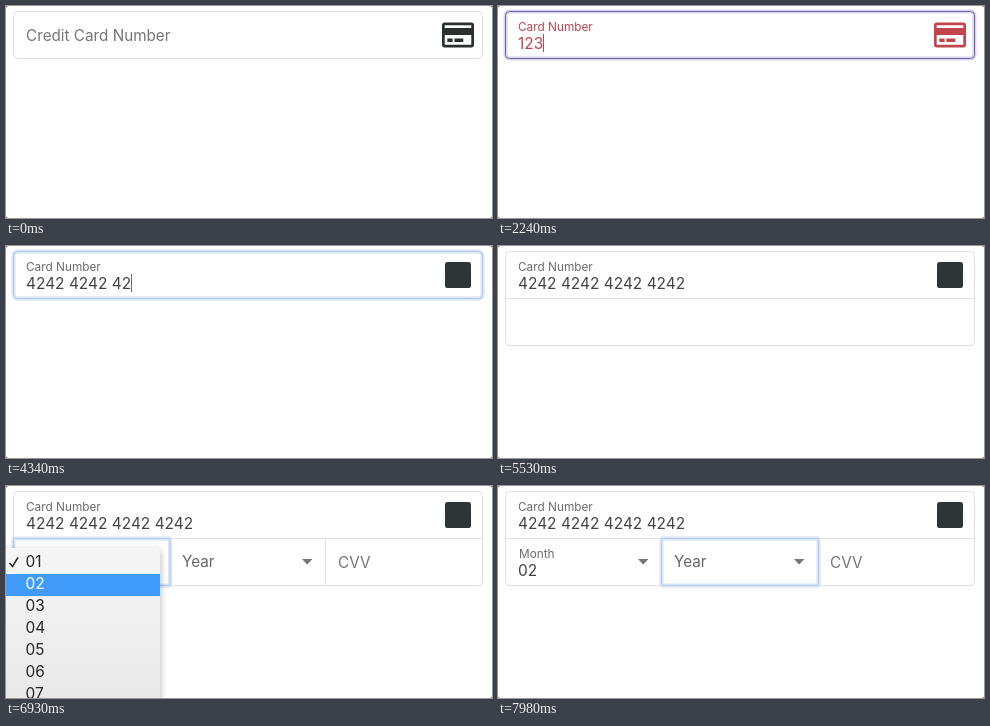
Write an HTML page that moves like this. It is 486 px wide and 212 px high and loops after 8 s.

```html
<!DOCTYPE html>
<html lang="en">
<head>
<meta charset="utf-8">
<title>Credit card form</title>
<style>
  html, body { margin: 0; width: 100%; height: 100%; overflow: hidden; background: #777; }
  svg { display: block; }
  text { font: 15.25px Inter, "Noto Sans", sans-serif; fill: #757575; white-space: pre; }
  .small { font-size: 11.8px; fill: #6c6c6c; }
  .value, #menu text { font-size: 15.45px; fill: #444; }
  .line { fill: none; stroke: #e0e0e0; }
  .glow { fill: none; stroke: #d7e3f7; stroke-width: 4; }
  .edge { fill: none; stroke: #bacdec; }
  .arrow { fill: #757575; }
  #menu text { fill: #262626; }
</style>
</head>
<body>
<svg width="486" height="212" viewBox="0 0 486 212">
  <defs>
    <linearGradient id="sheet" x1="0" y1="0" x2="0" y2="1">
      <stop offset="0" stop-color="#f6f6f6"/><stop offset="1" stop-color="#e7e7e7"/>
    </linearGradient>
    <filter id="soft" x="-20%" y="-20%" width="140%" height="140%"><feGaussianBlur stdDeviation="3.5"/></filter>
  </defs>
  <rect width="486" height="212" rx="2.5" fill="#fff"/>

  <rect id="frame" class="line" x="7.5" y="5.5" width="469" rx="4"/>
  <path id="split" class="line" d="M7.5 52.5H476.5"/>
  <g id="columns">
    <path class="line" d="M163.5 52.5V99.5M319.5 52.5V99.5"/>
    <text id="monthHint" x="20" y="81">Month</text>
    <g id="monthFilled">
      <text class="small" x="21" y="72">Month</text>
      <text class="value" x="20" y="89.5">02</text>
    </g>
    <text x="176" y="81" style="fill:#666">Year</text>
    <text x="332" y="81.5">CVV</text>
    <path class="arrow" d="M140 73h10.4l-5.2 5.6zM296 73h10.4l-5.2 5.6z"/>
  </g>

  <g id="cardRing">
    <rect class="glow" x="7.5" y="5.5" width="469" height="47" rx="4"/>
    <rect class="edge" x="7.5" y="5.5" width="469" height="47" rx="4"/>
  </g>
  <g id="monthRing">
    <rect class="glow" x="7.5" y="52.5" width="156.5" height="47" rx="1"/>
    <rect class="edge" x="7.5" y="52.5" width="156.5" height="47" rx="1"/>
  </g>
  <g id="yearRing">
    <rect class="glow" x="163.5" y="52.5" width="157" height="47" rx="1"/>
    <rect class="edge" x="163.5" y="52.5" width="157" height="47" rx="1"/>
  </g>

  <text id="hint" x="20" y="35">Credit Card Number</text>
  <text id="label" class="small" x="20" y="25">Card Number</text>
  <rect id="selection" x="20" y="28" height="18" fill="#b5d5fe"/>
  <text id="number" class="value" x="20" y="43"></text>
  <rect id="caret" width="1" height="18"/>

  <path id="card" fill-rule="evenodd" d="M438.7 16.5h26.6a2.7 2.7 0 0 1 2.7 2.7v19.5a2.7 2.7 0 0 1-2.7 2.7h-26.6a2.7 2.7 0 0 1-2.7-2.7v-19.5a2.7 2.7 0 0 1 2.7-2.7zM438.7 19.2v2.7h26.6v-2.7zM438.7 28.9v9.8h26.6v-9.8zM441.3 32.5h5.3v3.5h-5.3zM448.4 32.5h8.9v3.5h-8.9z"/>
  <rect id="brand" x="439" y="16" width="26" height="26" rx="2.5" fill="#2f3437"/>

  <g id="menu">
    <rect x="-12" y="64" width="167" height="170" rx="5" fill="#000" opacity=".25" filter="url(#soft)"/>
    <rect x="-12" y="62" width="166" height="170" rx="5" fill="url(#sheet)"/>
    <rect id="pick" y="88" width="154" height="22" fill="#409bfb"/>
    <path d="M3.5 77l3 3.5 5.5-9" fill="none" stroke="#262626" stroke-width="1.5"/>
  </g>
</svg>
<script>
const LOOP = 8000, STEP = 70;
const DARK = [43, 47, 48], INK = [68, 68, 68], GREY = [108, 108, 108], RED = [194, 68, 77];
const EDGE = [186, 205, 236], GLOW = [215, 227, 247], BAD_EDGE = [112, 99, 170], BAD_GLOW = [218, 214, 238];
const $ = id => document.getElementById(id);
const menu = $('menu'), number = $('number');
const [glow, edge] = $('cardRing').children;

for (let i = 1; i <= 7; i++) {
  const item = document.createElementNS('http://www.w3.org/2000/svg', 'text');
  item.textContent = '0' + i;
  item.setAttribute('x', 19.5);
  item.setAttribute('y', 59 + 22 * i);
  menu.append(item);
}
const picked = menu.querySelectorAll('text')[1];

const ramp = (t, a, b) => Math.min(1, Math.max(0, (t - a) / (b - a)));
const mix = (a, b, k) => `rgb(${a.map((v, i) => Math.round(v + (b[i] - v) * k))})`;
const show = (id, alpha) => { $(id).style.opacity = +alpha; };

// Key presses for the rejected and the accepted number
const BAD_KEYS = [1960, 2100, 2240];
const KEYS = [3010, 3220, 3360, 3430, 3640, 3710, 3920, 3990, 4200, 4340, 4550, 4620, 4830, 4970, 5250, 5390];

function typed(t) {
  const count = keys => keys.filter(k => k <= t).length;
  if (t < KEYS[0]) return '123'.slice(0, count(BAD_KEYS));
  return '42'.repeat(8).slice(0, count(KEYS)).replace(/(.{4})(?=.)/g, '$1 ');
}

function draw(t) {
  const text = typed(t);
  number.textContent = text;
  const width = text ? number.getComputedTextLength() : 0;

  const bad = ramp(t, 2030, 2240) - ramp(t, 2940, 3220);
  number.style.fill = mix(INK, RED, bad);
  $('label').style.fill = mix(GREY, RED, bad);
  $('card').style.fill = mix(DARK, RED, bad);
  edge.style.stroke = mix(EDGE, BAD_EDGE, bad);
  glow.style.stroke = mix(GLOW, BAD_GLOW, bad);

  show('hint', !text);
  show('label', ramp(t, 1890, 2100));
  show('card', t < 3010);
  show('brand', t >= 3010);
  show('cardRing', ramp(t, 1050, 1260) - ramp(t, 5390, 5530));

  const selected = t >= 2590 && t < 3010;
  show('selection', selected);
  $('selection').setAttribute('width', width);
  const blinkOff = t >= 1610 && t < 1960;
  show('caret', t >= 1120 && t < 5460 && !selected && !blinkOff);
  $('caret').setAttribute('x', Math.round(20 + width));
  $('caret').setAttribute('y', text ? 28 : 20);
  $('caret').style.fill = mix(GREY, RED, bad);

  const open = t >= 5460, chosen = t >= 7770;
  $('frame').setAttribute('height', open ? 94 : 47);
  show('split', open);
  show('columns', ramp(t, 5530, 5950));
  show('monthHint', !chosen);
  show('monthFilled', chosen);
  show('monthRing', ramp(t, 6160, 6440) - ramp(t, 7700, 7910));
  show('yearRing', ramp(t, 7700, 7980));

  // The chosen item blinks once before the menu fades
  const lit = t !== 7490;
  show('pick', lit);
  picked.style.fill = lit ? '#fff' : '#262626';
  show('menu', t >= 6930 ? 1 - ramp(t, 7560, 7770) : 0);
}

function frame() {
  const t = performance.now() % LOOP;
  draw(Math.floor(t / STEP) * STEP);
  requestAnimationFrame(frame);
}
frame();
</script>
</body>
</html>
```
